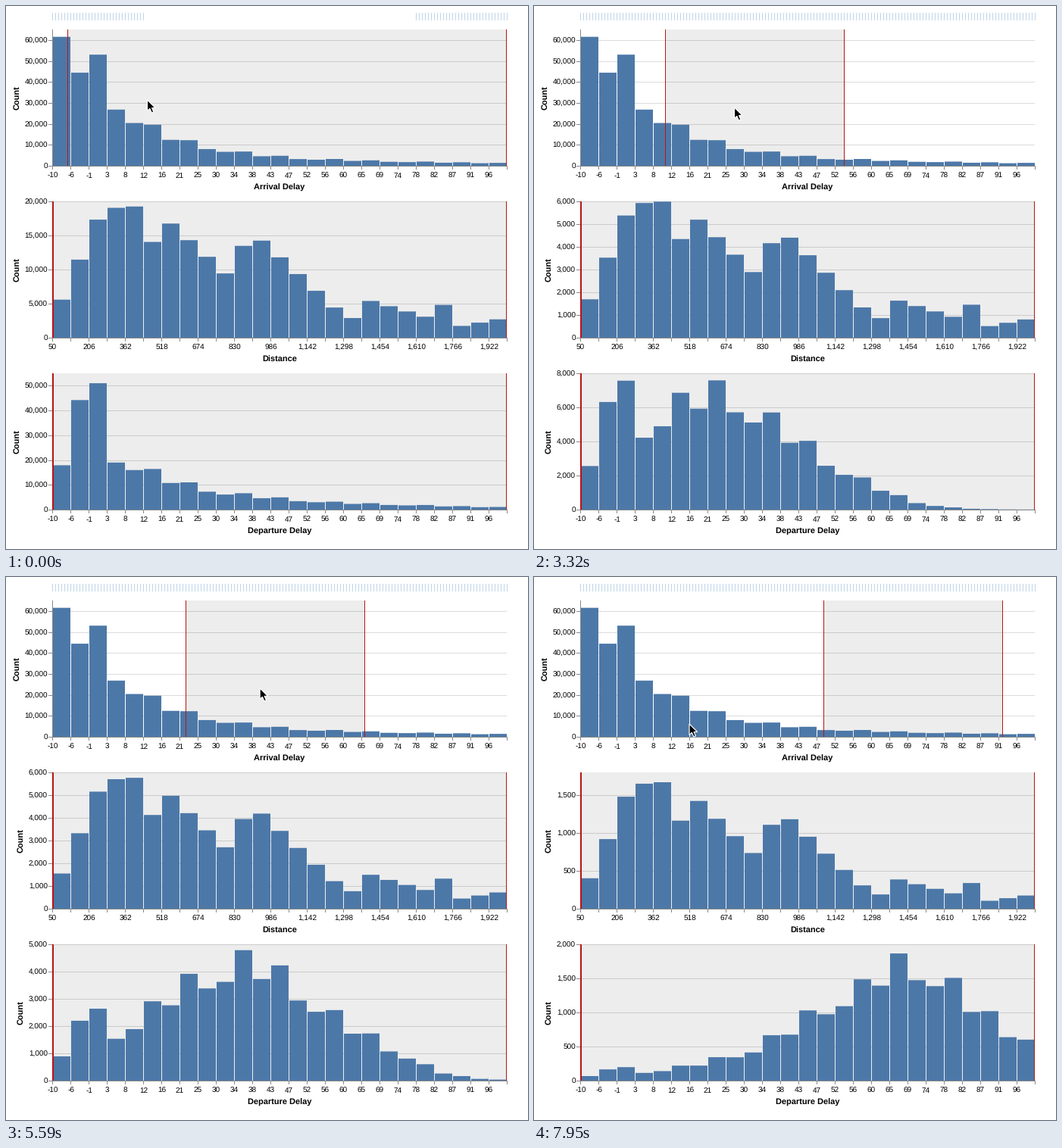
Recreate the animation shown at these times as a matplotlib script. Size 689 by 717 pixels, loop 8000 ms.

```python
import math
import numpy as np
import matplotlib.pyplot as plt
from matplotlib.animation import FuncAnimation
from matplotlib.collections import LineCollection, PolyCollection
from matplotlib.patches import Polygon, Rectangle

W, H = 689, 717
INTERVAL, LOOP = 50, 8000
X0, X1, BIN, HEIGHT, BINS = 61, 661, 24, 180, 25
BLUE, GREY, RED, AXIS = "#4c78a8", "#ededed", "#b81414", "#888888"

plt.rcParams.update({"font.family": "Liberation Sans", "text.hinting": "none"})

# Delays are whole minutes, so bins of 4.4 minutes hold four or five of them.
MINUTES = np.arange(-10, 101)
BIN_OF = np.minimum((MINUTES + 10) / 4.4 + 1e-9, BINS - 1).astype(int)
PER_BIN = np.bincount(BIN_OF)
CENTRE = np.bincount(BIN_OF, MINUTES) / PER_BIN


def delay_counts(*points):
    """Counts per bin from a few (minute, flights per minute) points."""
    minute, rate = zip(*points)
    return PER_BIN * np.exp(np.interp(CENTRE, minute, np.log(rate)))


ARRIVALS = delay_counts((-8, 12300), (-3.5, 11100), (1, 10600), (5.5, 6700),
                        (9.5, 5100), (14, 3920), (23, 2440), (36, 1360),
                        (49.5, 800), (67, 520), (98, 280))
DEPARTURES = delay_counts((-8, 3580), (-3.5, 11050), (1, 10200), (5.5, 4750),
                          (14, 3280), (23, 2200), (31.5, 1520), (40.5, 1150),
                          (58, 640), (76, 420), (98, 215))
HILLS = np.interp(range(BINS), *zip(
    (0, .29), (2, .9), (3, .99), (4, 1), (5, .73), (6, .87), (9, .49), (10, .7),
    (11, .74), (15, .23), (16, .15), (17, .28), (20, .16), (21, .25), (22, .09),
    (24, .14)))


def share_above(cut):
    """Share of each departure bin whose flights arrive later than the cut."""
    gap = np.maximum(CENTRE, .6) - cut
    width = np.where(gap < 0, 8.5 + max(cut, 0) / 30, 7)
    return 1 / (1 + np.exp(-gap / width))


def departure_counts(low, high):
    return DEPARTURES * np.maximum(share_above(low) - share_above(high), 0)


def distance_counts(peak, low):
    return peak * HILLS ** np.interp(low, [10, 55], [1, 1.15])


# time, brush left and right, departure cut low and high, distance peak
KEYS = np.array([
    (50, 81, 661, -90, 200, 19250),
    (1000, 135, 661, 6, 200, 11300),
    (1850, 135, 191, 11.5, 21.8, 2985),
    (2000, 135, 191, 11.5, 21.8, 2985),
    (2650, 135, 371, 7, 55, 8400),
    (3300, 173, 409, 16.6, 62, 5990),
    (3450, 173, 409, 16.6, 62, 5990),
    (4750, 366, 602, 54.5, 99.5, 1840),
    (4900, 366, 602, 54.5, 99.5, 1840),
    (6100, 127, 363, 6, 54, 9080),
    (6250, 127, 363, 6, 54, 9080),
    (6400, 112, 348, 4.5, 52, 10300),
    (7200, 212, 448, 27.2, 70.5, 4090),
    (7350, 212, 448, 27.2, 70.5, 4090),
    (7950, 382, 618, 58.4, 101, 1670)])
# time, x, y
CURSOR = np.array([
    (50, 186.5, 124), (900, 140, 124), (1200, 600, 124), (1700, 225, 124),
    (1850, 232.5, 124.5), (2000, 232.5, 124.5), (2550, 372, 130),
    (3300, 264.5, 134), (3450, 264.5, 134), (4750, 499.5, 149),
    (4900, 499.5, 149), (6100, 196, 145), (6250, 196, 145), (6400, 165, 150),
    (7200, 430, 180), (7350, 430, 180), (7600, 520, 186), (7950, 205, 194)])


def at(path, t):
    """Values of a keyed path at a time."""
    return [np.interp(t, path[:, 0], column) for column in path[:, 1:].T]


def tick_step(span, count):
    raw = span / count
    power = 10 ** math.floor(math.log10(raw))
    e = raw / power
    return power * (10 if e >= 50 ** .5 else 5 if e >= 10 ** .5
                    else 2 if e >= 2 ** .5 else 1)


# The tiny margin keeps the canvas from being rounded down a pixel.
fig = plt.figure(figsize=((W + .01) / 72, (H + .01) / 72), dpi=72, facecolor="white")
ax = fig.add_axes([0, 0, W / (W + .01), H / (H + .01)])
ax.set_xlim(0, W)
ax.set_ylim(H, 0)
ax.axis("off")


def lines(segments, color, z, width=1):
    return ax.add_collection(LineCollection(segments, colors=[color], snap=False,
                                            linewidths=width, zorder=z),
                             autolim=False)


def label(x, y, text="", ha="center", **style):
    return ax.text(x, y, text, ha=ha, va="baseline",
                   **{"fontsize": 10, "color": "black", **style})


def vertical(x, y0, y1):
    return [(x, y0), (x, y1)]


class Histogram:
    def __init__(self, y, title, tick_labels):
        self.y, self.base = y, y + HEIGHT
        self.back = ax.add_patch(Rectangle((X0, y), X1 - X0, HEIGHT, fc=GREY, lw=0, zorder=1))
        self.grid = lines([], (0, 0, 0, .14), 2)
        self.bars = ax.add_collection(PolyCollection([], facecolors=BLUE, linewidths=0,
                                                     snap=False, zorder=3), autolim=False)
        self.ticks = lines([], AXIS, 4)
        self.labels = [label(55, 0, ha="right") for _ in range(9)]
        self.name = label(17, y + HEIGHT / 2, "Count", fontsize=11, weight="bold",
                          rotation=90, rotation_mode="anchor")
        axis = [[(X0, self.base + .5), (X1, self.base + .5)],
                vertical(X0 + .5, y, self.base)]
        axis += [vertical(X0 + BIN * i + .5, self.base, self.base + 5)
                 for i in range(BINS + 1)]
        lines(axis, AXIS, 4)
        for i, text in tick_labels:
            label(X0 + BIN * i + .5, self.base + 15.5, text)
        label(361, self.base + 31.5, title, fontsize=11, weight="bold")

    def draw(self, counts):
        nice = tick_step(counts.max(), 10)
        limit = math.ceil(counts.max() / nice) * nice
        scale = HEIGHT / limit
        self.bars.set_verts([
            [(x + 1, self.base), (x + 1, self.base - c * scale),
             (x + BIN, self.base - c * scale), (x + BIN, self.base)]
            for x, c in zip(range(X0, X1, BIN), counts)])
        values = np.arange(0, limit + 1, tick_step(limit, 5))
        rows = [round(self.base - v * scale) + .5 for v in values]
        self.grid.set_segments([[(X0, r), (X1, r)] for r in rows])
        self.ticks.set_segments([[(X0 - 5, r), (X0, r)] for r in rows])
        for text in self.labels:
            text.set_text("")
        for text, v, r in zip(self.labels, values, rows):
            text.set_text(f"{v:,.0f}")
            text.set_y(r + 3.2)
        self.name.set_x(17 if values[-1] >= 10000 else 22.5)


delay_labels = [(i, str(round(-10 + 4.4 * i))) for i in range(BINS)]
miles_labels = [(i, f"{50 + 78 * i:,}") for i in range(0, BINS, 2)]
arrival = Histogram(31, "Arrival Delay", delay_labels)
distance = Histogram(258, "Distance", miles_labels)
departure = Histogram(485, "Departure Delay", delay_labels)
arrival.draw(ARRIVALS)

for chart in (distance, departure):
    lines([vertical(X0 + 1, chart.y, chart.base)], RED, 5, 2)
    lines([vertical(X1 - .5, chart.y, chart.base)], RED, 5)

brush = lines([], RED, 5)
progress = lines([], "#c0d4e8", 2)

ARROW = np.array([(0, 0), (0, 14.5), (3.3, 11.4), (5.8, 17), (8.4, 15.9),
                  (6, 10.5), (10.6, 10.5)])
pointer = ax.add_patch(Polygon(ARROW, fc="black", ec="white", lw=1.2, zorder=9))


def update(frame):
    t = frame * INTERVAL
    left, right, low, high, peak = at(KEYS, t)
    distance.draw(distance_counts(peak, low))
    departure.draw(departure_counts(low, high))

    left, right = round(left), round(right)
    arrival.back.set_bounds(left, arrival.y, right - left, HEIGHT)
    brush.set_segments([vertical(x + .5, arrival.y, arrival.base)
                        for x in (left, min(right, X1 - 1))])

    # Loading marks fill in from both ends.
    ends = np.interp(t, [50, 1000], [183, 361]), np.interp(t, [50, 1000], [541, 361])
    progress.set_segments([vertical(x + .5, 9, 19) for x in range(X0, X1 + 1, 4)
                           if x <= ends[0] or x >= ends[1]])
    pointer.set_xy(ARROW + at(CURSOR, t))
    return []


anim = FuncAnimation(fig, update, frames=LOOP // INTERVAL, interval=INTERVAL,
                     init_func=lambda: update(0), repeat=True, repeat_delay=0)
plt.show()
```
